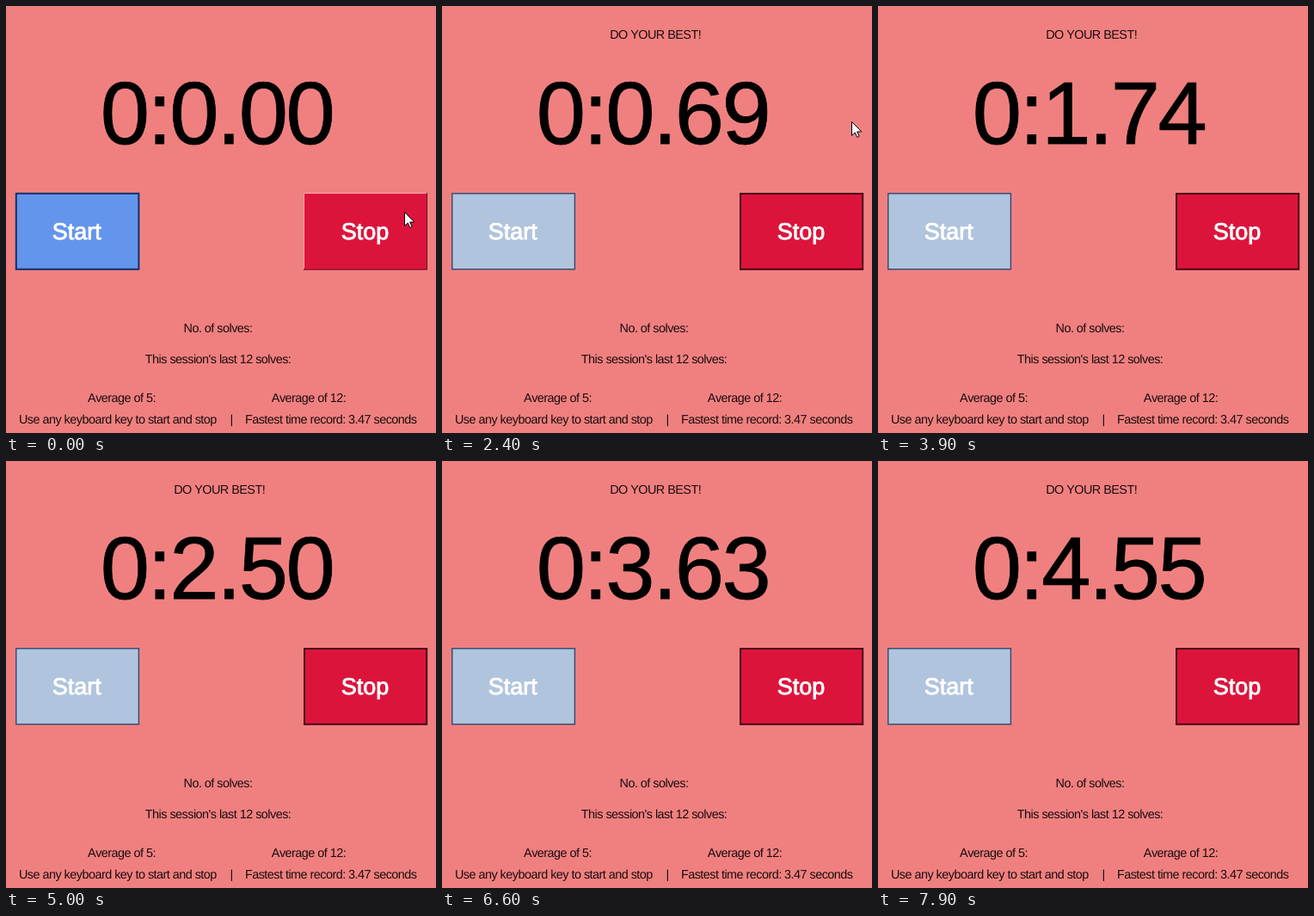
An HTML page that plays this animation: 500x496 px, repeating every 8000 ms.

```html
<!DOCTYPE html>
<html lang="en">
<head>
<meta charset="utf-8">
<title>Solve timer</title>
<style>
  html, body { margin: 0; width: 100%; height: 100%; overflow: hidden; background: #f08080; }
  svg { display: block; width: 500px; height: 496px; }
  text { font-family: "Liberation Sans", Arial, sans-serif; text-anchor: middle;
         font-kerning: none; text-rendering: geometricPrecision; }
  #labels text { font-size: 14.4px; letter-spacing: -.52px; fill: #1c0c0c; }
  #clock { font-size: 103px; letter-spacing: -2.7px; fill: #000; stroke: #000; stroke-width: .8px; }
  .caption { font-size: 27px; fill: #fff; stroke: #fff; stroke-width: .9px; }
</style>
</head>
<body>
<svg viewBox="0 0 500 496">
  <rect width="500" height="496" fill="#f08080"/>
  <g id="labels">
    <text id="cheer" x="248.2" y="38.3">DO YOUR BEST!</text>
    <text x="246.5" y="379">No. of solves:</text>
    <text x="246.6" y="415">This session's last 12 solves:</text>
    <text x="134.5" y="460">Average of 5:</text>
    <text x="352" y="460">Average of 12:</text>
    <text x="129.9" y="485.2">Use any keyboard key to start and stop</text>
    <text x="262" y="485.2">|</text>
    <text x="377.7" y="485.2">Fastest time record: 3.47 seconds</text>
  </g>
  <text id="clock" x="244.9" y="159.5">0:0.00</text>

  <rect id="start" x="11.8" y="217.8" width="142.6" height="88"/>
  <text class="caption" x="82.2" y="271">Start</text>

  <rect x="346" y="217" width="144" height="89.5" fill="#dc143c"/>
  <g id="bevel" fill="none">
    <path d="M346.5 305V217.5H489" stroke="#f7a9ae"/>
    <path d="M346 306H489.5V217" stroke="#5e1424"/>
  </g>
  <rect id="focus" x="347" y="218" width="142.2" height="87.8" fill="none" stroke="#4a0618" stroke-width="2"/>
  <text class="caption" x="417.5" y="271">Stop</text>

  <path id="cursor" d="M.5 .5V16.5L4.2 13L6.8 18.5L9.2 17.4L6.7 12H11.8Z" fill="#fff" stroke="#000"/>
</svg>
<script>
  const LOOP = 8000, STEP = 100, BEGIN = 1500, CURSOR_END = 3300;
  const $ = id => document.getElementById(id);

  // [ms, hundredths of a second]
  const ticks = [[1500, 6], [3200, 125], [3900, 174], [5000, 250], [6600, 363], [7900, 455]];
  // [ms, x, y]
  const track = [[0, 463, 239], [900, 453, 141], [1200, 451, 134], [1500, 451, 134],
                 [2100, 478, 134], [2600, 475, 134], [3200, 471, 134]];

  function sample(keys, t, col) {
    let i = 1;
    while (i < keys.length - 1 && t > keys[i][0]) i++;
    const a = keys[i - 1], b = keys[i];
    const p = Math.min(1, Math.max(0, (t - a[0]) / (b[0] - a[0])));
    return a[col] + (b[col] - a[col]) * p;
  }

  function show(id, on) {
    $(id).setAttribute("visibility", on ? "visible" : "hidden");
  }

  function draw(t) {
    const running = t >= BEGIN;
    const n = running ? Math.floor(sample(ticks, t, 1) + .01) : 0;
    $("clock").textContent = `0:${Math.floor(n / 100)}.${String(n % 100).padStart(2, "0")}`;

    show("cheer", running);
    show("focus", running);
    show("bevel", !running);
    const start = $("start");
    start.setAttribute("fill", running ? "#b0c4de" : "#6495ed");
    start.setAttribute("stroke", running ? "#2f4a70" : "#12306c");
    start.setAttribute("stroke-width", running ? 1.4 : 2);

    show("cursor", t < CURSOR_END);
    const x = Math.round(sample(track, t, 1)), y = Math.round(sample(track, t, 2));
    $("cursor").setAttribute("transform", `translate(${x} ${y})`);
  }

  const origin = performance.now();
  function frame() {
    const t = (performance.now() - origin) % LOOP;
    draw(Math.floor(t / STEP) * STEP);
    requestAnimationFrame(frame);
  }
  draw(0);
  requestAnimationFrame(frame);
</script>
</body>
</html>
```
